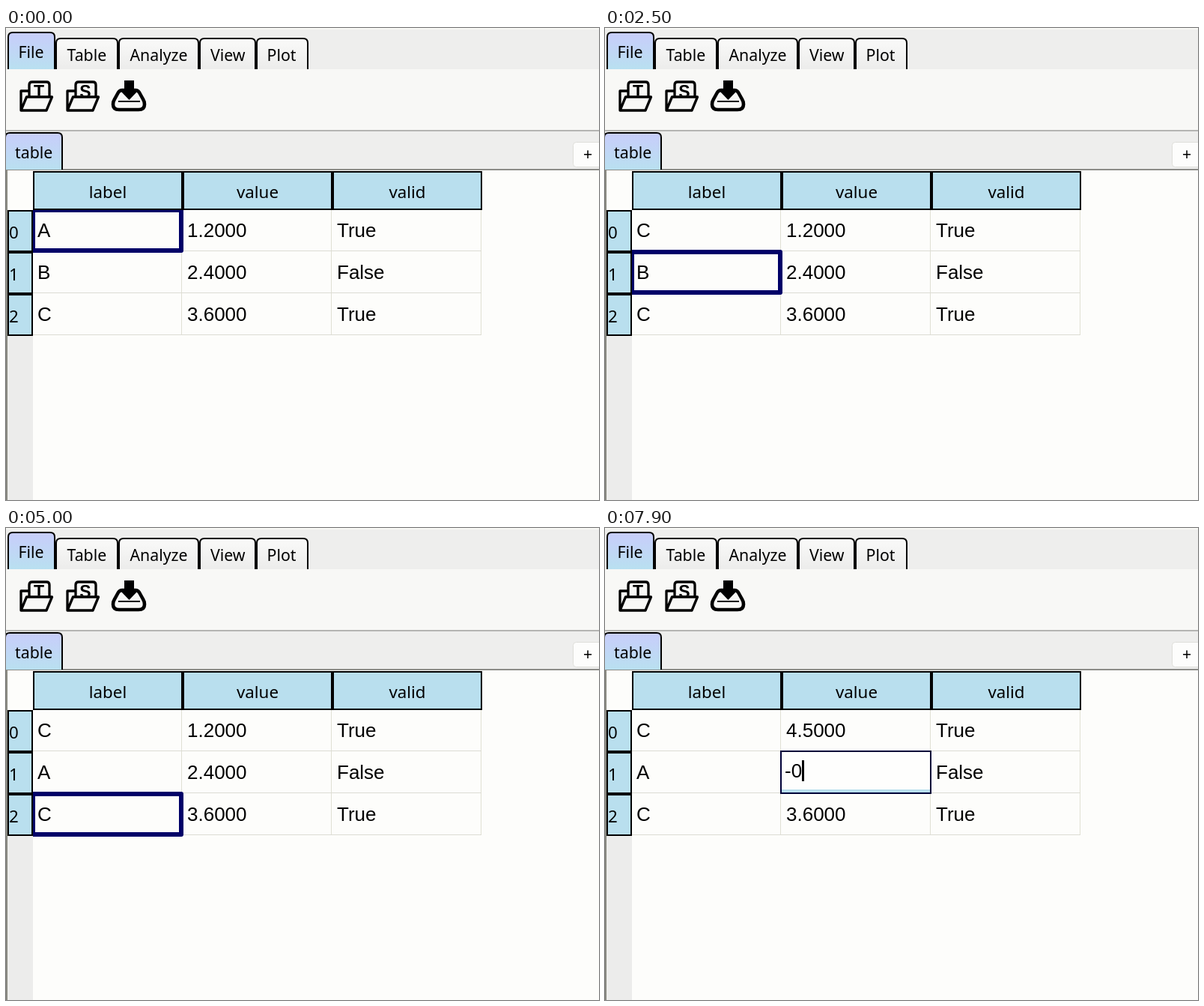
These frames come from a looping animation (792x630 px, 8 s). An HTML page:

```html
<!DOCTYPE html>
<html lang="en">
<head>
<meta charset="utf-8">
<title>Table editor</title>
<style>
  html, body { margin: 0; width: 100%; height: 100%; overflow: hidden; background: #fdfdfb; }
  svg { display: block; width: 792px; height: 630px; }
  text { fill: #000; white-space: pre; }
  .ui { font: 21.3px "Noto Sans", "Open Sans", sans-serif; }
  .head { font: 22.3px "Noto Sans", "Open Sans", sans-serif; }
  .cell { font: 26px "Liberation Sans", Arial, sans-serif; }
  .icon { fill: none; stroke: #000; stroke-width: 3.3; stroke-linejoin: round; }
  .letter { font: bold 23px "Liberation Sans", Arial, sans-serif; }
  .mid { text-anchor: middle; }
</style>
</head>
<body>
<svg id="stage" viewBox="0 0 792 630">
  <defs>
    <linearGradient id="on" x2="0" y2="1">
      <stop stop-color="#c8cdfb"/><stop offset="1" stop-color="#b9e0f0"/>
    </linearGradient>
    <linearGradient id="off" x2="0" y2="1">
      <stop stop-color="#fafaf9"/><stop offset="1" stop-color="#ececeb"/>
    </linearGradient>
    <clipPath id="view"><rect x="36" y="243" width="756" height="387"/></clipPath>
    <clipPath id="sheet"><rect x="18" y="68" width="48" height="22.5"/></clipPath>
  </defs>
  <rect width="792" height="630" fill="#fdfdfb"/>
  <rect width="792" height="55" fill="#eeeeed"/>
  <rect width="792" height="2" fill="#f8f8f4"/>
  <rect y="55" width="792" height="81" fill="#f8f8f6"/>
  <rect y="138" width="792" height="50" fill="#eeeeed"/>
  <rect y="136" width="792" height="2" fill="#b4b4b2"/>
  <rect y="188" width="792" height="2" fill="#8c8c88"/>
  <rect x="2" y="411" width="34" height="219" fill="#ececeb"/>
  <rect y="190" width="2" height="440" fill="#888880"/>
  <rect x="757.5" y="152.5" width="40" height="33" rx="4" fill="#fdfdfc" stroke="#dededa"/>
  <text class="ui mid" x="777" y="176">+</text>
  <g id="tabs"></g>
  <g id="icons"></g>
  <g id="grid"></g>
  <g id="cells"></g>
  <g id="heads"></g>
  <g clip-path="url(#view)">
    <rect id="frame" x="1" y="1" fill="none" stroke="#000068" stroke-width="6" stroke-linejoin="round" width="198" height="54"/>
    <g id="editor">
      <rect width="200" height="56" fill="#fefefd"/>
      <rect x="1" y="51" width="198" height="4" fill="#b9dfee"/>
      <rect width="200" height="56" fill="none" stroke="#000038" stroke-width="2"/>
      <text id="typed" class="cell" x="5" y="35"></text>
      <rect id="caret" y="12" width="3" height="28"/>
    </g>
  </g>
</svg>
<script>
const NS = "http://www.w3.org/2000/svg";
const $ = id => document.getElementById(id);
const LOOP = 8000, COL = 200, ROW = 56;

function add(parent, tag, attrs, text) {
  const el = document.createElementNS(NS, tag);
  for (const k in attrs) el.setAttribute(k, attrs[k]);
  if (text !== undefined) el.textContent = text;
  $(parent).append(el);
  return el;
}

function tab(label, left, right, top, bottom, fill, textX, base) {
  const l = left + 1, r = right - 1, t = top + 1;
  add("tabs", "path", {
    d: `M${l} ${bottom}V${t + 6}Q${l} ${t} ${l + 6} ${t}H${r - 6}Q${r} ${t} ${r} ${t + 6}V${bottom}`,
    fill: `url(#${fill})`, stroke: "#000", "stroke-width": 2
  });
  add("tabs", "text", { class: "ui", x: textX, y: base }, label);
}
tab("Table", 66, 150, 13, 55, "off", 81.5, 44);
tab("Analyze", 150, 258, 13, 55, "off", 165.5, 44);
tab("View", 258, 334, 13, 55, "off", 273, 44);
tab("Plot", 334, 404, 13, 55, "off", 348.5, 44);
tab("File", 2, 66, 5, 55, "on", 16.5, 40);
tab("table", -2, 76, 139, 189, "on", 12, 174);

function folder(letter, dx) {
  const move = `translate(${dx} 0)`;
  add("icons", "path", {
    class: "icon", transform: move,
    d: "M31 84H20V110L27.500 92H61.500L54 110H20M31 91V76Q31 72 35 72H54Q58 72 58 76V91"
  });
  add("icons", "text", {
    class: "letter mid", x: 44, y: 92.5, transform: move, "clip-path": "url(#sheet)"
  }, letter);
}
folder("T", 0);
folder("S", 62);
add("icons", "path", {
  class: "icon", style: "stroke-width:4.6",
  d: "M158 83H155Q152 83 150 86L145 95Q143 98 143 102Q143 109 151 109H177Q185 109 185 102Q185 98 183 95L178 86Q176 83 173 83H171"
});
add("icons", "path", { d: "M158 70H171V83H177L164.500 96L152 83H158ZM150 97H179V99H150Z" });

function head(x, y, w, h) {
  add("heads", "rect", {
    x: x + 1, y: y + 1, width: w - 2, height: h - 2,
    fill: "#b9dfee", stroke: "#000", "stroke-width": 2
  });
}
["label", "value", "valid"].forEach((name, c) => {
  head(36 + c * COL, 191, COL, 52);
  add("heads", "text", { class: "head mid", x: 136 + c * COL, y: 227 }, name);
  add("grid", "rect", { x: 234 + c * COL, y: 243, width: 1, height: 167, fill: "#e0e0d4" });
});
for (let r = 0; r < 3; r++) {
  head(2, 243 + r * ROW, 34, ROW);
  add("heads", "text", { class: "head", x: 4, y: 281 + r * ROW }, r);
  add("grid", "rect", { x: 36, y: 297 + r * ROW, width: 599, height: 1, fill: "#dcdcd4" });
}

const start = [
  ["A", "1.2000", "True"],
  ["B", "2.4000", "False"],
  ["C", "3.6000", "True"]
];
const cells = start.map((row, r) => row.map((value, c) =>
  add("cells", "text", { class: "cell", x: 42 + c * COL, y: 279 + r * ROW }, value)));

// Steps: time, row, column, text being typed (if any)
const steps = [
  [0, 0, 0],
  [2100, 0, 0, "C"],
  [2400, 1, 0],
  [4000, 1, 0, "A"],
  [4500, 2, 0],
  [5100, 0, 1],
  [5600, 0, 1, "4"],
  [5800, 0, 1, "4."],
  [6100, 0, 1, "4.5"],
  [6500, 1, 1],
  [7600, 1, 1, "-"],
  [7800, 1, 1, "-0"]
];
// Committed edits: time, row, column, value
const edits = [[2400, 0, 0, "C"], [4500, 1, 0, "A"], [6500, 0, 1, "4.5000"]];

let shown = -1;
function draw(t) {
  const i = steps.findLastIndex(s => s[0] <= t);
  if (i === shown) return;
  shown = i;
  const [, row, col, typed] = steps[i];
  const editing = typed !== undefined;

  cells.forEach((line, r) => line.forEach((el, c) => { el.textContent = start[r][c]; }));
  for (const [at, r, c, value] of edits) if (t >= at) cells[r][c].textContent = value;

  const place = `translate(${35 + col * COL} ${242 + row * ROW})`;
  $("frame").setAttribute("transform", place);
  $("frame").style.display = editing ? "none" : "";
  $("editor").setAttribute("transform", place);
  $("editor").style.display = editing ? "" : "none";
  if (editing) {
    $("typed").textContent = typed;
    $("caret").setAttribute("x", Math.round(5 + $("typed").getComputedTextLength()));
  }
}

function tick() {
  draw(performance.now() % LOOP);
  requestAnimationFrame(tick);
}
tick();
</script>
</body>
</html>
```
